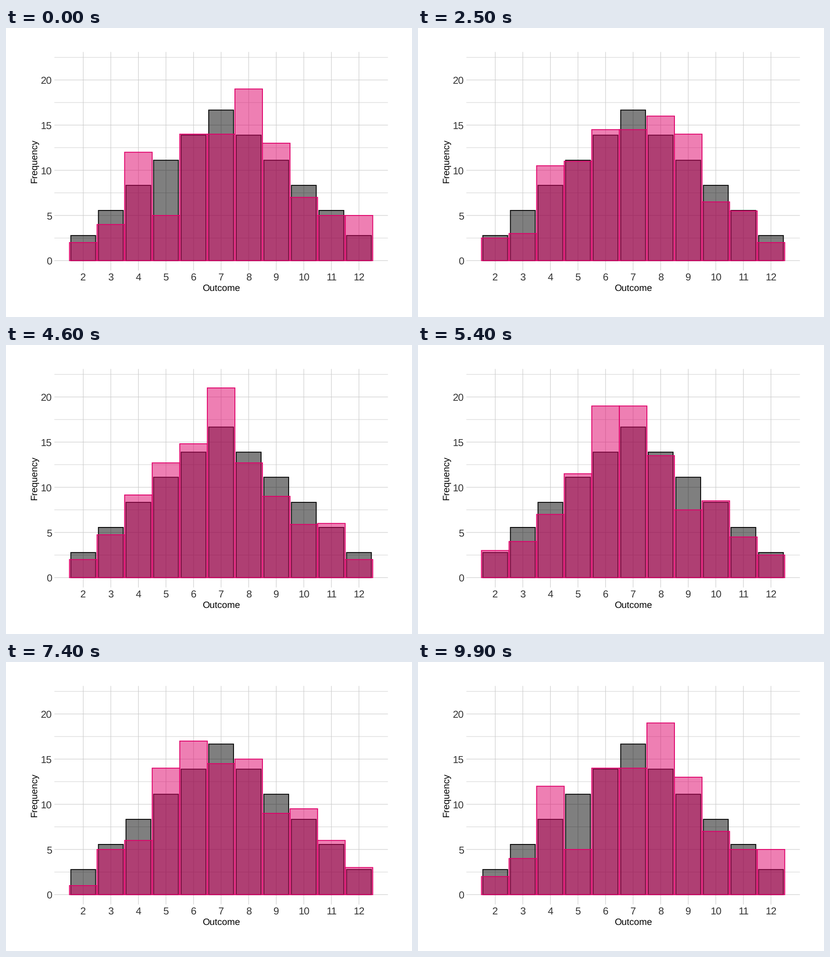
A matplotlib script that plays this animation: 885 px wide and 632 px high, repeating every 10 s.

```python
import numpy as np
import matplotlib.pyplot as plt
from matplotlib.animation import FuncAnimation
from matplotlib.patches import Rectangle

W, H, DPI = 885, 632, 100
FRAMES, INTERVAL = 100, 100
PX = 72 / DPI

plt.rcParams["font.family"] = ["Liberation Sans"]
plt.rcParams["text.hinting"] = "none"

GRID, TICK, PINK = "#cccccc", "#333333", "#df0069"
OUTCOMES = np.arange(2, 13)
EXPECTED = (6 - np.abs(OUTCOMES - 7)) / 36 * 100

# Counts of each total in successive batches of 100 rolls of two dice.
ROLLS = np.array([
    [2, 4, 12, 5, 14, 14, 19, 13, 7, 5, 5],
    [4, 4, 9, 9, 16, 13, 16, 12, 8, 7, 2],
    [3, 4, 10, 9, 15, 12, 19, 13, 7, 6, 2],
    [2, 2, 11, 13, 14, 17, 13, 15, 6, 5, 2],
    [2, 9, 10, 11, 8, 21, 11, 9, 11, 6, 2],
    [2, 4, 9, 13, 16, 21, 13, 9, 5, 6, 2],
    [4, 4, 5, 10, 22, 17, 14, 6, 12, 3, 3],
    [2, 7, 5, 14, 16, 17, 12, 9, 8, 8, 2],
    [0, 3, 7, 14, 18, 12, 18, 9, 11, 4, 4],
    [1, 6, 8, 11, 14, 19, 13, 11, 8, 6, 3],
])
STEPS = len(ROLLS)
KEYS = np.ceil((FRAMES - 1) * np.arange(STEPS + 1) / STEPS - 0.5).astype(int)

X_UNIT, Y_UNIT = 60.1, 19.755
LEFT, RIGHT, TOP, BOTTOM = 105.4, 832.5, 52.4, 530.3


def px_x(v):
    return 168.4 + (v - 2) * X_UNIT


def px_y(v):
    return 508.7 - v * Y_UNIT


def ease(t):
    return 4 * t ** 3 if t < 0.5 else 1 - 4 * (1 - t) ** 3


def counts(i):
    k = min(np.searchsorted(KEYS, i, side="right") - 1, STEPS - 1)
    p = ease((i - KEYS[k]) / (KEYS[k + 1] - KEYS[k]))
    a, b = ROLLS[k], ROLLS[(k + 1) % STEPS]
    return a + (b - a) * p


fig = plt.figure(figsize=(W / DPI, H / DPI), dpi=DPI, facecolor="white")
ax = fig.add_axes([0, 0, 1, 1])
ax.set(xlim=(0, W), ylim=(H, 0))
ax.axis("off")


def line(xs, ys, width):
    ax.plot(xs, ys, color=GRID, lw=width * PX, snap=False,
            solid_capstyle="butt", zorder=1)


def label(x, y, text, size, color, **kw):
    kw = {"ha": "center", "va": "baseline", **kw}
    ax.text(x, y, text, fontsize=size * PX, color=color, **kw)


def bars(width, fill, edge, zorder):
    made = []
    for v in OUTCOMES:
        bar = Rectangle((px_x(v - width / 2), px_y(0)), width * X_UNIT, 0,
                        facecolor=fill, edgecolor=edge, lw=1.9 * PX,
                        joinstyle="miter", snap=False, zorder=zorder)
        made.append(ax.add_patch(bar))
    return made


def set_heights(group, values):
    for bar, v in zip(group, values):
        bar.set_height(-v * Y_UNIT)


for v in np.arange(2.5, 23, 5):
    line([LEFT, RIGHT], [px_y(v)] * 2, 0.9)
for v in range(0, 21, 5):
    line([LEFT, RIGHT], [px_y(v)] * 2, 1.15)
    label(100.2, px_y(v) + 8.5, str(v), 22, TICK, ha="right")
for v in OUTCOMES:
    line([px_x(v)] * 2, [TOP, BOTTOM], 1.15)
    label(px_x(v), 551.6, str(v), 22, TICK)

label((LEFT + RIGHT) / 2, 575.6, "Outcome", 20.3, "black")
label(67.3, (TOP + BOTTOM) / 2, "Frequency", 20.3, "black",
      rotation=90, ha="right", va="center", rotation_mode="default")
# Anchor the rotated title on its baseline.
ax.texts[-1].set(rotation_mode="anchor", ha="center", va="baseline")

set_heights(bars(0.9, (0, 0, 0, 0.5), "black", 2), EXPECTED)
rolled = bars(1, (0.875, 0, 0.41, 0.5), PINK, 3)


def draw(i):
    set_heights(rolled, counts(i))
    return rolled


anim = FuncAnimation(fig, draw, frames=FRAMES, interval=INTERVAL,
                     init_func=lambda: draw(0), repeat=True,
                     repeat_delay=0, blit=False)
plt.show()
```
